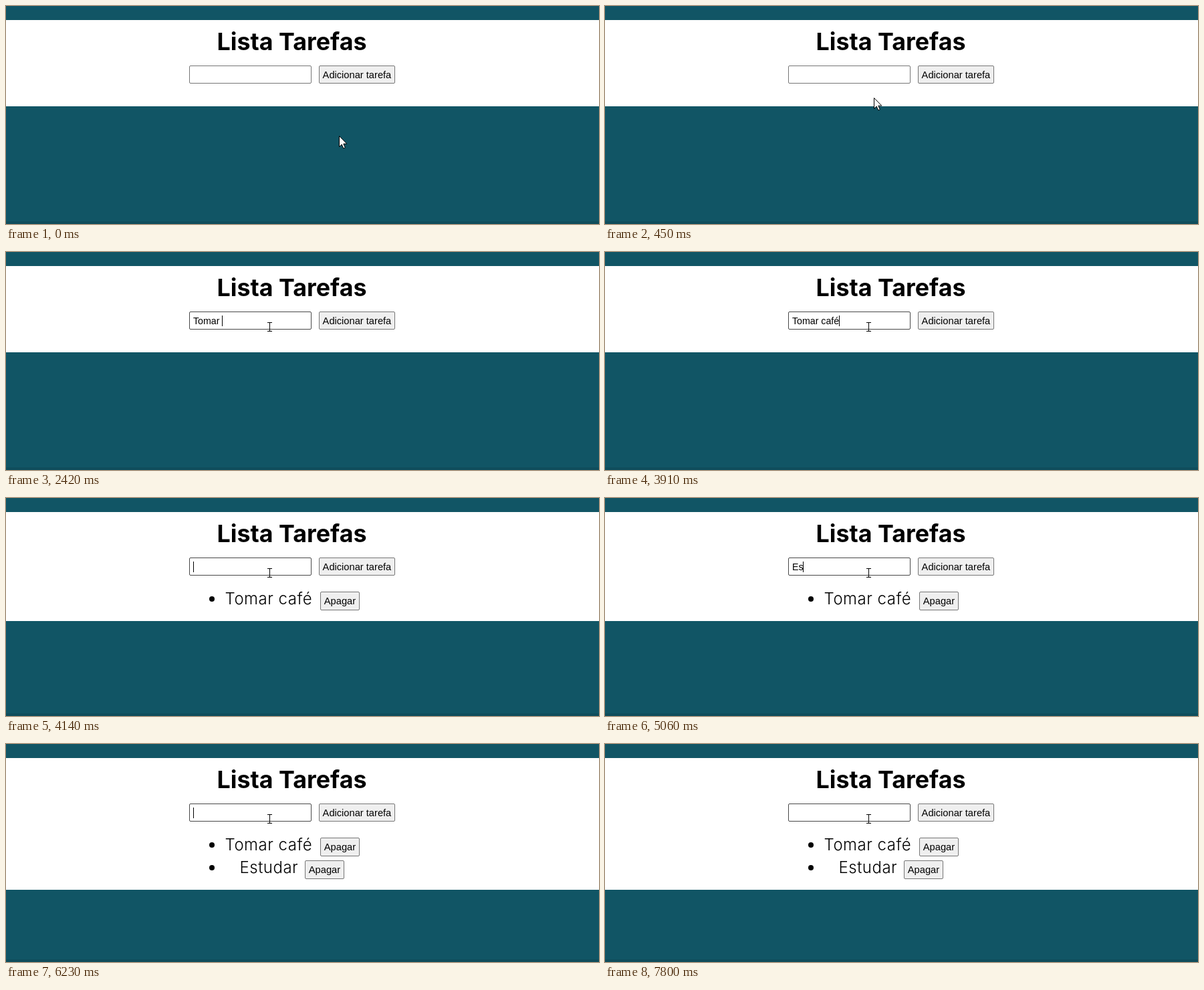
Recreate the animation shown at these times as an HTML page with a canvas. Size 887 px wide and 326 px high, loop 8000 ms.

```html
<!DOCTYPE html>
<html lang="pt">
<head>
<meta charset="utf-8">
<title>Lista Tarefas</title>
<style>
html, body { margin: 0; width: 100%; height: 100%; overflow: hidden; background: #115565; }
canvas { display: block; }
</style>
</head>
<body>
<canvas id="stage" width="887" height="326"></canvas>
<script>
const ctx = document.getElementById('stage').getContext('2d');
const LOOP = 8000;
const UI = '"Liberation Sans", Arial, sans-serif';
const HEAD = 'Inter, "Open Sans", sans-serif';
const FOCUS_AT = 540;
const ARRIVE_AT = 460;

// Input contents: [time, text, caret visible]
const typing = [
  [0, '', false], [FOCUS_AT, '', true], [1010, '', false], [1480, '', true],
  [1630, 'T', true], [1880, 'To', true], [2110, 'Toma', true],
  [2340, 'Tomar', true], [2420, 'Tomar ', true], [2800, 'Tomar c', true],
  [3370, 'Tomar ca', true], [3590, 'Tomar caf', true], [3910, 'Tomar café', true],
  [4140, '', true], [4750, '', false],
  [4830, 'E', true], [5060, 'Es', true], [5380, 'Est', true], [5530, 'Estu', true],
  [5680, 'Estud', true], [5850, 'Estuda', true], [6080, 'Estudar', true],
  [6230, '', true], [6780, '', false], [7250, '', true], [7800, '', false]
];

const tasks = [
  { at: 4140, name: 'Tomar café', x: 328, button: 470 },
  { at: 6230, name: 'Estudar', x: 350, button: 447 }
];
const ROW = 34;

function rect(x, y, w, h, color) {
  ctx.fillStyle = color;
  ctx.fillRect(x, y, w, h);
}

function text(str, x, y, font, spacing = 0) {
  ctx.font = font;
  ctx.letterSpacing = spacing + 'px';
  ctx.fillStyle = '#000';
  ctx.fillText(str, x, y);
}

function box(x, y, w, h, fill, stroke) {
  ctx.beginPath();
  ctx.roundRect(x + 0.5, y + 0.5, w - 1, h - 1, 1.5);
  ctx.fillStyle = fill;
  ctx.fill();
  ctx.lineWidth = 1;
  ctx.strokeStyle = stroke;
  ctx.stroke();
}

function button(label, x, y, w, h, pad, base) {
  box(x, y, w, h, '#efefef', '#767676');
  text(label, x + pad, y + base, '14.667px ' + UI);
}

function input(t) {
  const [, value, caret] = typing.findLast(s => s[0] <= t);
  box(274, 89, 183, 27, '#fff', t < FOCUS_AT ? '#767676' : '#484848');
  text(value, 280, 108, '14.2px ' + UI);
  if (caret) rect(Math.floor(280.2 + ctx.measureText(value).width), 95, 1, 16, '#000');
}

function task(item, i) {
  const y = 140 + i * ROW;
  ctx.beginPath();
  ctx.arc(308, y + 11, 4, 0, Math.PI * 2);
  ctx.fillStyle = '#000';
  ctx.fill();
  text(item.name, item.x - 0.5, y + 19, '300 24px ' + HEAD, 0.5);
  button('Apagar', item.button, y, 59, 28, 5.8, 19);
}

function arrow(x, y) {
  const pts = [[0, 0], [0, 16], [3.7, 12.6], [6.3, 18.4], [8.8, 17.3], [6.3, 11.6], [11.3, 11.6]];
  ctx.beginPath();
  pts.forEach(([dx, dy]) => ctx.lineTo(x + dx + 0.5, y + dy + 0.5));
  ctx.closePath();
  ctx.fillStyle = '#fff';
  ctx.fill();
  ctx.lineWidth = 1;
  ctx.strokeStyle = '#000';
  ctx.stroke();
}

function beam(x, y) {
  rect(x, y - 6, 1, 13, '#000');
  rect(x - 3, y - 6, 7, 1, '#000');
  rect(x - 3, y + 7, 7, 1, '#000');
}

// Pointer follows a curve in six steps, then rests over the field
function pointer(t) {
  const step = t < 70 ? 0 : Math.min(6, 1 + Math.floor((t - 70) / 78));
  const p = t >= ARRIVE_AT ? 1 : step / 6;
  const bend = (a, b, c) => Math.round((1 - p) ** 2 * a + 2 * p * (1 - p) * b + p * p * c);
  const x = bend(498, 414, 394), y = bend(194, 197, 111);
  (y < 116 ? beam : arrow)(x, y);
}

function draw(t) {
  const shown = tasks.filter(item => item.at <= t);
  rect(0, 0, 887, 326, '#115565');
  rect(0, 322, 887, 4, '#0f4d5c');
  rect(0, 21, 887, 129 + shown.length * ROW, '#fff');
  text('Lista Tarefas', 315.5, 66, '700 35.8px ' + HEAD);
  input(t);
  button('Adicionar tarefa', 468, 89, 114, 27, 5.6, 19);
  shown.forEach(task);
  pointer(t);
}

const start = performance.now();
function tick() {
  draw((performance.now() - start) % LOOP);
  requestAnimationFrame(tick);
}
tick();
</script>
</body>
</html>
```
